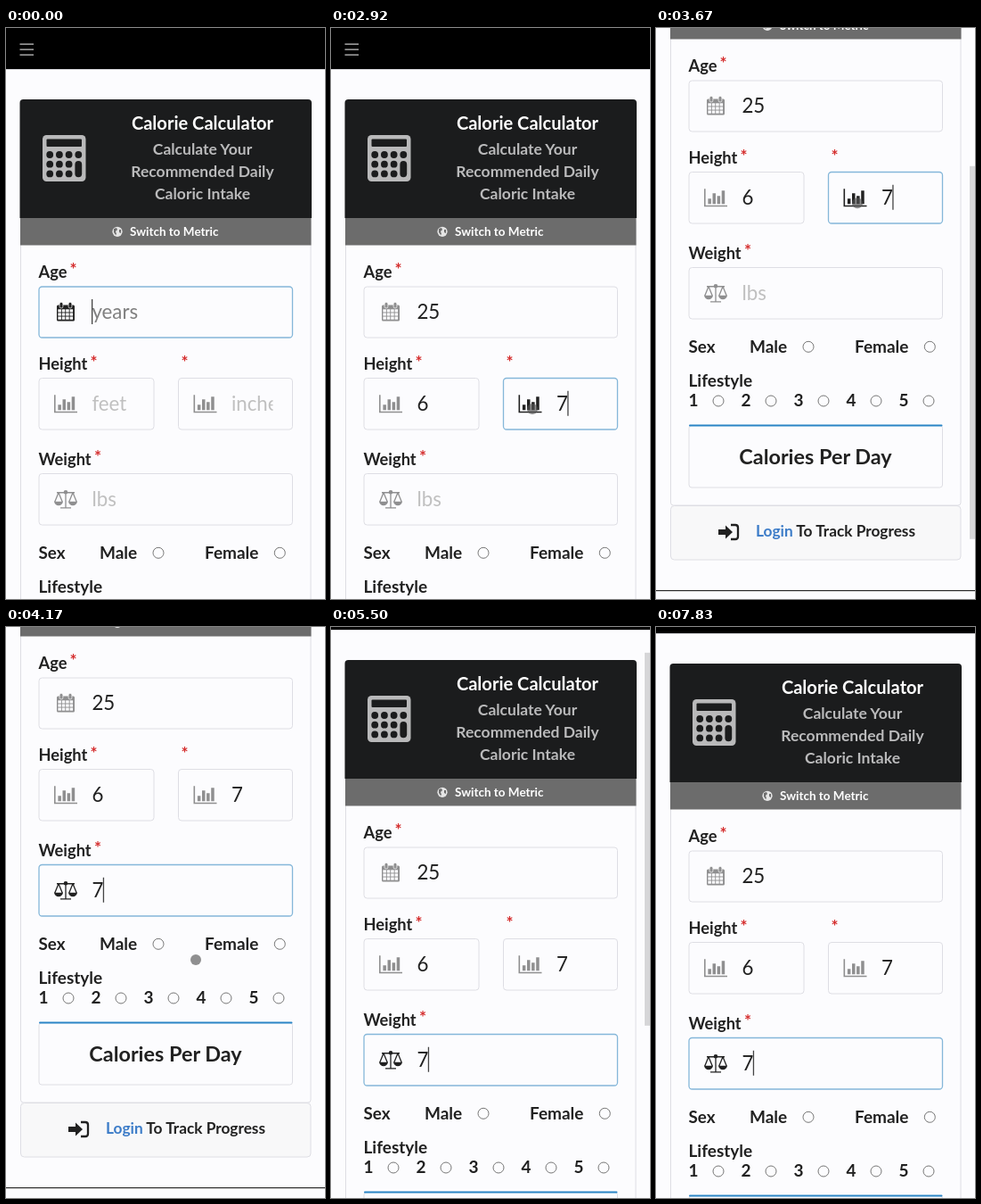
An HTML page that plays this animation: 358 by 640 pixels, repeating every 8000 ms.

```html
<!DOCTYPE html>
<html lang="en">
<head>
<meta charset="utf-8">
<title>Calorie Calculator</title>
<style>
  html, body { margin: 0; width: 100%; height: 100%; overflow: hidden; background: #fcfcfe; }
  svg { display: block; width: 100vw; height: 100vh; font-family: Lato, "Open Sans", sans-serif; }
  .b { font-weight: 700; }
  .ink { fill: #212121; }
  .value { font-size: 22.3px; }
</style>
</head>
<body>
<svg id="stage" viewBox="0 0 358 640"></svg>
<script>
const LOOP = 8000;
const INK = "#212121", DARK = "#1b1c1d", BAND = "#6c6c6c";
const PALE = "#dedee4", PAPER = "#fcfcfe", MUTED = "#8f8f90";
const stage = document.getElementById("stage");

const text = (x, y, size, str, attrs = 'class="b ink"') =>
  `<text x="${x}" y="${y}" font-size="${size}" ${attrs}>${str}</text>`;
const box = (x, y, w, h, attrs) =>
  `<rect x="${x}" y="${y}" width="${w}" height="${h}" ${attrs}/>`;
const dot = (x, y, r, attrs = "") => `<circle cx="${x}" cy="${y}" r="${r}" ${attrs}/>`;
const radio = (x, y) => dot(x, y, 6, `fill="${PAPER}" stroke="#777"`);
const star = (x, y) => text(x + 0.5, y + 8.5, 19, "*", 'class="b" fill="#d42a2a" text-anchor="middle"');
const grid = (cols, rows, draw) => {
  let out = "";
  for (let r = 0; r < rows; r++) for (let c = 0; c < cols; c++) out += draw(c, r);
  return out;
};

// Field icons, centred on the origin and painted in currentColor
const icons = {
  calendar: box(-10, -8, 20, 18, 'rx="1.5" fill="currentColor"') +
    grid(4, 3, (c, r) => box(-8.6 + c * 4.4, -3.2 + r * 4.1, 3.5, 3.2, `fill="${PAPER}"`)) +
    [-5, 5].map(x => box(x - 1.9, -11, 3.8, 6.4, `rx="1.6" fill="currentColor" stroke="${PAPER}" stroke-width=".7"`)).join(""),
  chart: '<path d="M-12.2-10V9.3H13" fill="none" stroke="currentColor" stroke-width="1.6"/>' +
    [6, 12, 9, 15].map((h, i) => box(-8.6 + i * 5.1, 7 - h, 3.5, h, 'fill="currentColor"')).join(""),
  scales: '<g fill="none" stroke="currentColor" stroke-width="1.3">' +
    '<path d="M0-9V9.5M-10-7.5H10M-6 9.7H6M-8-7.5L-12.3 3M-8-7.5L-3.7 3M8-7.5L3.7 3M8-7.5L12.3 3"/></g>' +
    '<g fill="currentColor"><path d="M-13 2.6H-3Q-4 7-8 7T-13 2.6ZM3 2.6H13Q12 7 8 7T3 2.6Z"/>' + dot(0, -8, 2.3) + '</g>'
};

const fields = [
  { x: 37, y: 290, w: 284.5, h: 57, icon: "calendar", hint: "years", focus: [0, 2000], keys: [[830, "2"], [1170, "25"]] },
  { x: 37, y: 392.5, w: 129, h: 57.5, icon: "chart", hint: "feet", focus: [2000, 2650], keys: [[2250, "6"]] },
  { x: 193.5, y: 392.5, w: 128, h: 57.5, icon: "chart", hint: "inches", focus: [2650, 3850], keys: [[2900, "7"]] },
  { x: 37, y: 499.5, w: 284.5, h: 57.5, icon: "scales", hint: "lbs", focus: [3850, LOOP], keys: [[4080, "7"]] }
];

const fieldMarkup = (f, i) => {
  const mid = f.y + f.h / 2;
  return box(f.x, f.y, f.w, f.h, `id="frame${i}" rx="3.5" fill="${PAPER}"`) +
    `<g id="icon${i}" transform="translate(${f.x + 30} ${mid})">${icons[f.icon]}</g>` +
    `<clipPath id="clip${i}">${box(f.x, f.y, f.w - 22, f.h, "")}</clipPath>` +
    `<text id="value${i}" class="value" x="${f.x + 59.4}" y="${mid + 7.5}" clip-path="url(#clip${i})"></text>`;
};

const calculator = () =>
  box(41, 120, 48.5, 52, 'rx="4.5" fill="#b9b9ba"') +
  box(45.5, 124.5, 39.5, 8.5, `rx="1" fill="${DARK}"`) +
  `<g fill="${DARK}">` +
  grid(4, 3, (c, r) => c === 3 && r ? "" : dot(49.2 + c * 10.7, 142 + r * 10.7, 3.9)) +
  box(77.4, 149, 7.8, 18.2, 'rx="3.9"') + '</g>';

const globe = () => dot(125, 228.3, 5.6, 'fill="#e4e4e4"') +
  `<path d="M121 225l3-1 1 2-2 2 1 3-1 1-2-3ZM127 226l2 0 0 4-2-1Z" fill="${BAND}"/>`;

const loginIcon = () =>
  `<path d="M70 793H78V788.5L86 796L78 803.5V799H70Z" fill="${INK}"/>` +
  `<path d="M84 788H89Q92 788 92 791V801Q92 804 89 804H84" fill="none" stroke="${INK}" stroke-width="2.3"/>`;

const centred = fill => `class="b" fill="${fill}" text-anchor="middle"`;

const header = () =>
  box(0, 0, 358, 46, 'fill="#000"') + box(0, 46, 358, 1, 'fill="#d8d8dc"') +
  [18, 24, 30].map(y => box(15.5, y - .5, 15.5, 1.2, 'fill="#d0d0d0"')).join("") +
  `<path d="M15.5 213V84Q15.5 80 19.5 80H339Q343 80 343 84V213Z" fill="${DARK}"/>` +
  calculator() +
  text(220.5, 114, 20.1, "Calorie Calculator", centred("#fff")) +
  ["Calculate Your", "Recommended Daily", "Caloric Intake"]
    .map((s, i) => text(220.5, 141.5 + i * 25, 17.5, s, centred("#bababb"))).join("");

const form = () =>
  box(16.5, 213.5, 325.5, 552.5, `rx="3" fill="${PAPER}" stroke="${PALE}"`) +
  box(16, 213, 326.5, 30.5, `fill="${BAND}"`) + globe() +
  text(139, 233, 13.5, "Switch to Metric", 'class="b" fill="#fff"') +
  text(36.5, 280, 18.3, "Age") + star(75, 268) +
  text(36.5, 383, 18.3, "Height") + star(98, 372) + star(200, 372) +
  text(36.5, 490, 18.3, "Weight") + star(102.5, 478) +
  fields.map(fieldMarkup).join("") +
  text(36.5, 594.5, 18.8, "Sex") +
  text(105, 594.5, 19, "Male") + radio(171, 588.3) +
  text(223, 594.5, 19, "Female") + radio(307.3, 588.3) +
  text(36.5, 632.5, 19, "Lifestyle") +
  [1, 2, 3, 4, 5].map((n, i) => text(36.5 + i * 59, 655, 19, n) + radio(70 + i * 59, 649)).join("") +
  box(37, 676.5, 284.5, 69.5, `rx="3" fill="${PAPER}" stroke="${PALE}"`) +
  box(37, 675.5, 284.5, 2, 'rx="1" fill="#2a85c6"') +
  text(179, 720.3, 23.4, "Calories Per Day", centred(INK));

const footer = () =>
  box(16.5, 766.5, 325.5, 60.5, `rx="4" fill="#f8f8f9" stroke="${PALE}"`) + loginIcon() +
  text(112, 801, 17.3, '<tspan fill="#3c7cc8">Login</tspan> To Track Progress') +
  box(0, 861, 358, 1.2, 'fill="#2a2a2a"');

const marquee = () =>
  '<rect x=".5" y=".5" width="357" height="639" fill="none" stroke="#a4a4a4" stroke-dasharray="3 3"/>' +
  [[179, 0], [179, 640], [0, 320], [358, 320]].map(([x, y]) => dot(x, y, 2.5, 'fill="#9a9a9a"')).join("");

stage.innerHTML =
  box(0, 0, 358, 640, `fill="${PAPER}"`) +
  `<g id="page">${header()}${form()}${footer()}<rect id="caret" width="1.3" height="28" fill="#444"/></g>` +
  box(352, 0, 6, 418, 'id="bar" fill="#d6d6d8"') +
  dot(0, 0, 6, 'id="pointer" fill="#555"') +
  `<g id="marquee">${marquee()}</g>`;

const el = id => document.getElementById(id);
const set = (id, attrs) => {
  for (const k in attrs) el(id).setAttribute(k, attrs[k]);
};
const span = (t, a, b) => Math.min(1, Math.max(0, (t - a) / (b - a)));
const easeInOut = u => u < 0.5 ? 2 * u * u : 1 - 2 * (1 - u) ** 2;

const DOWN = [3065, 3715], UP = [5040, 5550];

const scrollAt = t => Math.round(
  233 * easeInOut(span(t, ...DOWN)) - 194 * easeInOut(span(t, ...UP)));

const barAlpha = t => [DOWN, UP].reduce((a, [from, to]) =>
  a + span(t, from, from + 60) * (1 - span(t, to + 200, to + 350)), 0);

// Pointer stops: time, x, y; between DOWN times it drags the page along
const stops = [[1750, 104, 470], [1950, 100, 421], [2350, 100, 421], [2600, 226, 427], [DOWN[0], 226, 427],
  [DOWN[1], 226, 194], [3850, 213, 295], [4170, 213, 373], [4400, 213, 373]];

function pointerAt(t) {
  const i = stops.findIndex((s, k) => k && t < s[0]);
  if (i < 1 || t < stops[0][0]) return { opacity: 0 };
  const [a, b] = [stops[i - 1], stops[i]];
  const u = easeInOut(span(t, a[0], b[0]));
  return { cx: a[1] + (b[1] - a[1]) * u, cy: a[2] + (b[2] - a[2]) * u, opacity: 0.65 };
}

function drawField(f, i, t) {
  const active = t >= f.focus[0] && t < f.focus[1];
  const typed = f.keys.reduce((s, [at, str]) => t >= at ? str : s, "");
  set("frame" + i, { stroke: active ? "#85b7d9" : PALE, "stroke-width": active ? 1.3 : 1 });
  set("icon" + i, { color: active ? INK : MUTED });
  set("value" + i, { fill: typed ? INK : active ? "#808080" : "#c0c0c0" });
  el("value" + i).textContent = typed || f.hint;
  if (active) set("caret", { x: f.x + 59 + typed.length * 12.8, y: f.y + f.h / 2 - 14.5 });
}

function draw(t) {
  const scroll = scrollAt(t);
  set("page", { transform: `translate(0 ${-scroll})` });
  fields.forEach((f, i) => drawField(f, i, t));
  set("bar", { y: scroll * 0.67, opacity: barAlpha(t) });
  set("pointer", pointerAt(t));
  set("marquee", { opacity: t >= 5800 && t < 7000 ? 1 : 0 });
}

const start = performance.now();
function tick() {
  draw((performance.now() - start) % LOOP);
  requestAnimationFrame(tick);
}
tick();
</script>
</body>
</html>
```
